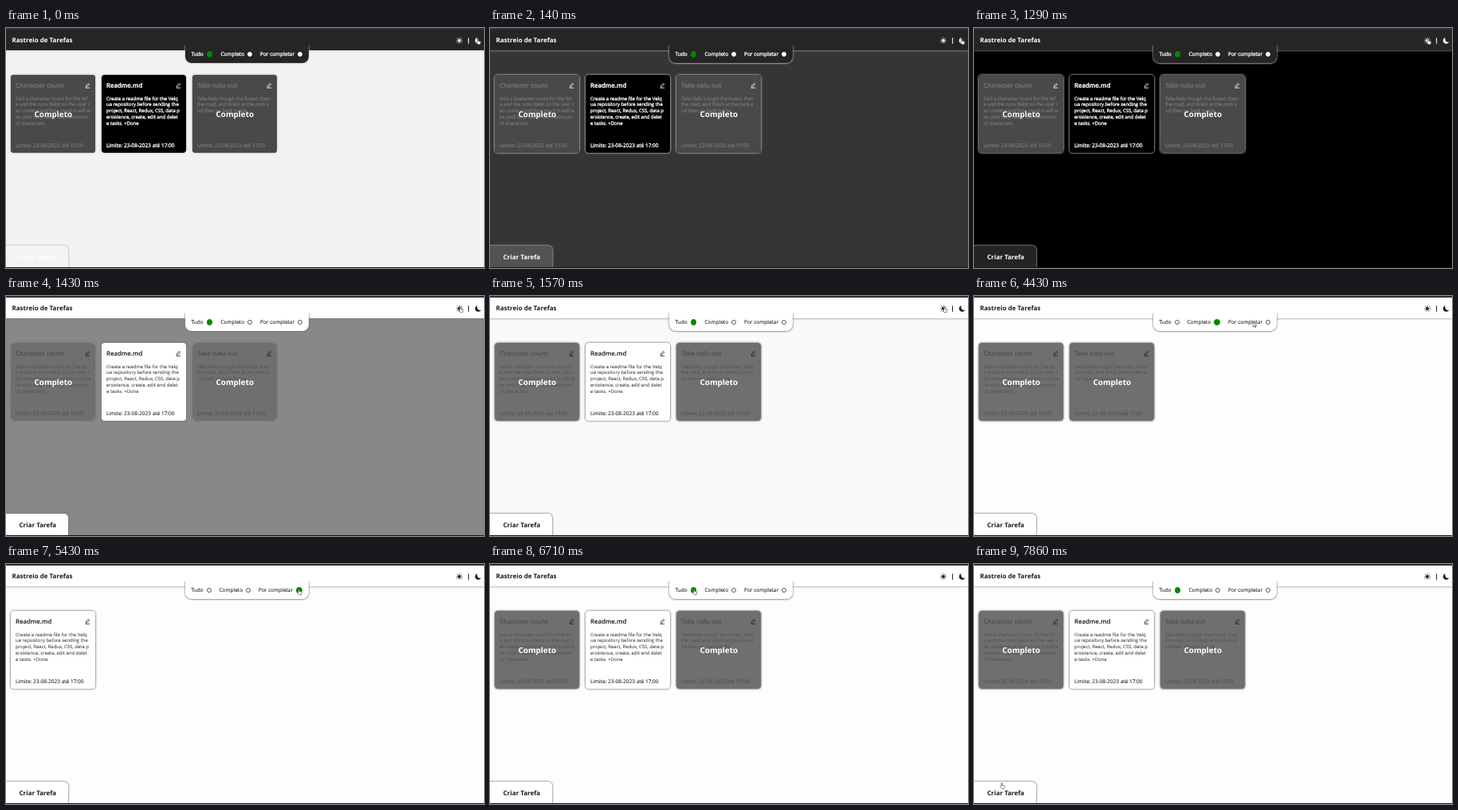
Write an HTML page that moves like this. It is 600x302 px and loops after 8000 ms.

```html
<!DOCTYPE html>
<html lang="pt">
<head>
<meta charset="utf-8">
<title>Rastreio de Tarefas</title>
<style>
html, body { margin: 0; width: 100%; height: 100%; overflow: hidden; }
#stage {
  --ink: #1c1c1c; --soft: #444; --panel: #fff; --card: #fff; --button: #fff; --glow: #777; --ring: #555; --stroke: .08px;
  position: relative; width: 600px; height: 302px; overflow: hidden;
  font: 6.5px/10px "Open Sans", "Noto Sans", sans-serif;
  color: var(--ink); text-rendering: geometricPrecision; white-space: pre;
}
#stage.dark {
  --ink: #fff; --soft: #fff; --panel: #252525; --card: #000; --button: rgba(255,255,255,.14); --glow: #bbb; --ring: #fff; --stroke: .32px;
}
#stage div, #stage svg { position: absolute; box-sizing: border-box; }
svg { overflow: visible; }
.edge { left: 0; width: 600px; z-index: 5; }
.head { left: 0; top: 0; width: 600px; height: 28px; background: var(--panel); box-shadow: 0 0 3px var(--glow); }
.brand { left: 7.5px; top: 11px; font-size: 8px; font-weight: 700; }
.nav {
  left: 224.5px; top: 21px; width: 155px; height: 23px; border-radius: 0 0 8px 8px;
  background: var(--panel); box-shadow: 0 .5px 2px .3px var(--glow); clip-path: inset(0 -5px -5px -5px);
}
.tab { top: 27.7px; -webkit-text-stroke: var(--stroke); }
.radio { border-radius: 50%; background: #fff; border: .8px solid var(--ring); }
.radio.on { background: #080; border-color: #080; }
.card { top: 59px; width: 106px; height: 98px; border-radius: 4px; background: var(--card); box-shadow: 0 0 2px .6px var(--glow); }
.name { left: 6px; top: 9.4px; font-size: 7.8px; font-weight: 600; -webkit-text-stroke: var(--stroke); }
.note { left: 6px; top: 26.6px; font-size: 5.96px; line-height: 7.8px; color: var(--soft); -webkit-text-stroke: var(--stroke); }
.due { left: 6px; top: 84px; font-size: 6.5px; -webkit-text-stroke: var(--stroke); }
.veil {
  inset: 0; border-radius: 4px; background: rgba(86,86,86,.85); color: #fff;
  font-size: 9.87px; font-weight: 700; line-height: 98.4px; text-align: center; text-indent: .6px;
}
.pen { left: 93.3px; top: 10.4px; }
.create {
  left: -4px; top: 274px; width: 82px; height: 32px; padding-left: 20.5px; border-radius: 0 5px 0 0;
  background: var(--button); box-shadow: 0 0 2px .5px var(--glow);
  font-size: 8px; font-weight: 700; line-height: 29px;
}
#icons, #cursor { left: 0; top: 0; }
#cursor { z-index: 9; }
</style>
</head>
<body>
<div id="stage">
  <div class="head"></div>
  <div class="brand">Rastreio de Tarefas</div>
  <div class="nav"></div>
  <svg id="icons" width="600" height="30" fill="none" stroke="var(--ink)">
    <circle cx="569" cy="15.8" r="2.1" fill="var(--ink)" stroke="none"/>
    <circle cx="569" cy="15.8" r="3.4" stroke-width="1.3" stroke-dasharray=".8 1.87" pathLength="21.36"/>
    <path d="M580.6 12.2v7.6"/>
    <path d="M591.6 12a4 4 0 1 0 4.8 5.5a3.9 3.9 0 0 1-4.8-5.5z" fill="var(--ink)" stroke="none"/>
  </svg>
  <div class="create">Criar Tarefa</div>
  <div class="edge" style="top:0;height:2px;background:#333"></div>
  <div class="edge" style="top:301px;height:1px;background:#151515"></div>
  <svg id="cursor" width="7" height="9" fill="#fff" stroke="#333" stroke-width=".6" stroke-linejoin="round">
    <path id="arrow" d="M.4.4v6.8l1.6-1.5 1 2.2 1-.5-1-2.1h2.1z"/>
    <path id="hand" d="M1.7 4.6V1a.6.6 0 0 1 1.2 0v2.2l2.3.5q.8.2.7 1l-.4 1.8-.4 1.3H2.4L.4 5.2q.2-1 1.3-.6z"/>
  </svg>
</div>
<script>
const $ = id => document.getElementById(id);
const stage = $('stage'), cursor = $('cursor');

function add(parent, cls, text = '') {
  const el = document.createElement('div');
  el.className = cls;
  el.textContent = text;
  parent.append(el);
  return el;
}

const PEN = `<svg class="pen" width="7" height="7" fill="none" stroke="var(--ink)" stroke-width=".8">
  <path d="M1.2 5.2l.4-1.7L4.6.6l1.2 1.2-3 2.9zM.6 6.4h5.6"/></svg>`;

const tasks = [
  ['Character count', 'Add a character count for the titl\ne and the note fields so the user c\nan understand how much it will ta\nke until they reach the maximum\nof characters.', '23-08-2023 até 15:05', true],
  ['Readme.md', 'Create a readme file for the Velq\nua repository before sending the\nproject, React, Redux, CSS, data p\nersistence, create, edit and delet\ne tasks. +Done', '23-08-2023 até 17:00', false],
  ['Take nalu out', 'Take Nalu trough the forest, then\nthe road, and finish at the park a\nnd then go back home.', '22-08-2023 até 17:00', true]
];
const cards = tasks.map(([name, note, due, done]) => {
  const el = add(stage, 'card');
  add(el, 'name', name);
  add(el, 'note', note);
  add(el, 'due', 'Limite: ' + due);
  if (done) add(el, 'veil', 'Completo');
  el.insertAdjacentHTML('beforeend', PEN);
  return { el, done };
});

// label, label x, radio x
const tabs = [['Tudo', 232.5, 251.7], ['Completo', 267.5, 301.2], ['Por completar', 317, 363.8]]
  .map(([label, x, rx]) => ({ x, rx, text: add(stage, 'tab', label), radio: add(stage, 'radio') }));

// tick, x, y, hand
const path = [
  [0, 590, 13, 1], [4, 590, 13, 1], [9, 568, 13, 1], [12, 568, 13, 1],
  [19, 309.5, 37, 0], [22, 309.5, 37, 0], [23, 306, 33, 1], [24, 304.5, 31, 1], [25, 304.5, 31, 1],
  [30, 347, 32, 0], [34, 365.3, 31, 1], [38, 365.3, 31, 1], [45, 254, 31, 1], [49, 254, 31, 1],
  [55, 32.5, 275, 1], [56, 32.5, 275, 1]
];
const fades = { 0: 242, 1: 53, 10: 136, 11: 249, 12: 249 };

function moveCursor(k) {
  const i = path.findIndex(p => p[0] > k);
  const a = path[i - 1], b = path[i];
  const p = (k - a[0]) / (b[0] - a[0]), e = p * p * (3 - 2 * p);
  const still = p === 0 || (a[1] === b[1] && a[2] === b[2]);
  const hand = still && a[3];
  cursor.style.transform = `translate(${a[1] + (b[1] - a[1]) * e}px, ${a[2] + (b[2] - a[2]) * e}px)`;
  $('hand').style.display = hand ? '' : 'none';
  $('arrow').style.display = hand ? 'none' : '';
}

function setFilter(sel) {
  tabs.forEach((t, i) => {
    const shift = sel < i ? 2 : 0, on = i === sel, size = on ? 7.8 : 6;
    t.text.style.left = t.x + shift + 'px';
    t.radio.classList.toggle('on', on);
    t.radio.style.cssText = `left:${t.rx + shift}px;top:${32.7 - size / 2}px;width:${size}px;height:${size}px`;
  });
  let slot = 0;
  for (const { el, done } of cards) {
    const show = sel === 0 || done === (sel === 1);
    el.style.display = show ? '' : 'none';
    if (show) el.style.left = 6 + 114 * slot++ + 'px';
  }
}

function render(k) {
  const dark = k < 10, level = fades[k] ?? (dark ? 0 : 253);
  stage.classList.toggle('dark', dark);
  stage.style.background = `rgb(${level},${level},${level})`;
  setFilter(k < 25 || k >= 47 ? 0 : k < 38 ? 1 : 2);
  moveCursor(k);
}

// seven ticks a second, aligned to 10 ms
let last = -1;
function loop() {
  const t = performance.now() % 8000;
  const k = Math.min(55, Math.floor((Math.floor(t / 10) + .5) * .07));
  if (k !== last) render(last = k);
  requestAnimationFrame(loop);
}
loop();
</script>
</body>
</html>
```
